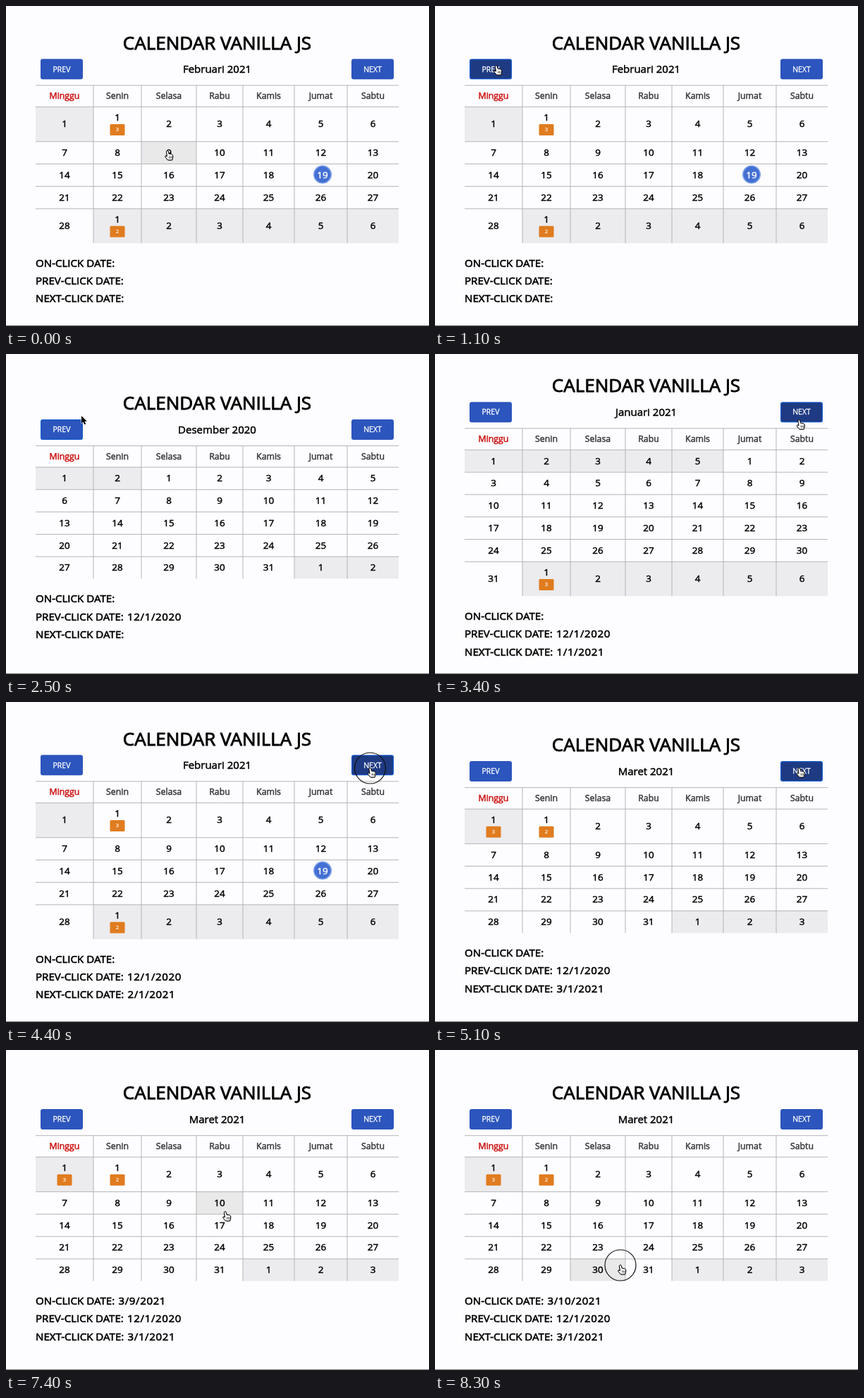
Recreate the animation shown at these times as an HTML page with a canvas. Size 600 by 455 pixels, loop 8.5 s.

```html
<!DOCTYPE html>
<html lang="id">
<head>
<meta charset="utf-8">
<title>Calendar Vanilla JS</title>
<style>
  html, body { margin: 0; width: 100%; height: 100%; overflow: hidden; background: #fdfcfe; }
  canvas { display: block; }
</style>
</head>
<body>
<canvas id="stage" width="600" height="455"></canvas>
<script>
const ctx = document.getElementById('stage').getContext('2d');
const LOOP = 8500, STEP = 100;

const COLUMNS = [42, 124, 192, 270, 336, 409, 484, 557];
const WEEKDAYS = ['Minggu', 'Senin', 'Selasa', 'Rabu', 'Kamis', 'Jumat', 'Sabtu'];
const MONTHS = { '-1': 'Desember 2020', 0: 'Januari 2021', 1: 'Februari 2021', 2: 'Maret 2021' };
const EVENTS = { '1/1': 3, '2/1': 2 };   // month index / day -> number of events
const HEAD = 30.5, ROW = 31.8, TALL_ROW = 49.4;
const PREV_X = 49, NEXT_X = 490, BUTTON_W = 60, BUTTON_H = 29;

// Timelines: [start time, value]
const monthLine = [[0, 1], [1200, 0], [2000, -1], [3200, 0], [3800, 1], [4500, 2]];
const focusLine = [[0, ''], [1100, 'PREV'], [3100, 'NEXT'], [6500, '']];
const dateLines = {
  ON: [[0, ''], [6600, '3/9/2021'], [7700, '3/10/2021']],
  PREV: [[0, ''], [1200, '1/1/2021'], [2000, '12/1/2020']],
  NEXT: [[0, ''], [3200, '1/1/2021'], [3800, '2/1/2021'], [4500, '3/1/2021']]
};
const clicks = [1000, 1900, 3000, 3700, 4400, 6500, 7600, 8300];

// Pointer path: time, x, y
const pointerPath = [
  [0, 229, 206], [900, 87, 85], [2000, 87, 85], [2100, 107, 88], [2500, 107, 88],
  [3000, 516.5, 94], [5100, 516.5, 94], [5800, 285, 247], [5900, 267.5, 251],
  [6300, 229, 214], [7000, 229, 214], [7400, 311, 230], [7600, 304, 216],
  [8000, 304, 216], [8200, 263, 306], [LOOP, 263, 306]
];

const handShape = new Path2D('M-1.6 .6Q-.3-1 1.1.4L2.1 4.3Q6.4 4 7.6 6.2L7.7 9 6.6 13H.6L-3 8.9Q-3.6 7.1-2 7L-.5 8Z');
const handFingers = new Path2D('M2.4 7.6l.3 3M4.2 7.6l.2 3M6 7.6v3');
const arrowShape = new Path2D('M0 0V10.6L2.5 8.4 4.3 12.3 6.2 11.5 4.5 7.7H7.8Z');

const valueAt = (line, t) => line.filter(([start]) => start <= t).pop()[1];

function pointerAt(t) {
  const i = pointerPath.findIndex(([time]) => time > t);
  const [t0, x0, y0] = pointerPath[i - 1], [t1, x1, y1] = pointerPath[i];
  const p = (t - t0) / (t1 - t0), eased = p * p * (3 - 2 * p);
  return { x: x0 + (x1 - x0) * eased, y: y0 + (y1 - y0) * eased };
}

function text(str, x, y, size, { color = '#000', align = 'center', weight = 0, spacing = 0 } = {}) {
  ctx.font = `${size}px "Open Sans", "Noto Sans", sans-serif`;
  ctx.textAlign = align;
  ctx.letterSpacing = spacing + 'px';
  ctx.fillStyle = ctx.strokeStyle = color;
  ctx.fillText(str, x, y);
  if (weight) {
    ctx.lineWidth = weight;
    ctx.lineJoin = 'round';
    ctx.strokeText(str, x, y);
  }
  return ctx.measureText(str).width;
}

function box(x, y, w, h, color, radius = 0) {
  ctx.fillStyle = color;
  ctx.beginPath();
  ctx.roundRect(x, y, w, h, radius);
  ctx.fill();
}

function circle(x, y, r, stroke, width, fill) {
  ctx.beginPath();
  ctx.arc(x, y, r, 0, Math.PI * 2);
  if (fill) { ctx.fillStyle = fill; ctx.fill(); }
  ctx.strokeStyle = stroke;
  ctx.lineWidth = width;
  ctx.stroke();
}

const inside = (p, r) => p.x >= r.x && p.x < r.x + r.w && p.y >= r.y && p.y < r.y + r.h;

function layout(month) {
  const lead = new Date(2021, month, 1).getDay();
  const days = new Date(2021, month + 1, 0).getDate();
  const cells = Array.from({ length: Math.ceil((lead + days) / 7) * 7 }, (_, i) => {
    const offset = i < lead ? -1 : i < lead + days ? 0 : 1;
    const day = i + 1 - [0, lead, lead + days][offset + 1];
    return {
      day, muted: offset !== 0,
      events: EVENTS[`${month + offset}/${day}`],
      today: month + offset === 1 && day === 19
    };
  });
  const heights = [];
  for (let i = 0; i < cells.length; i += 7)
    heights.push(cells.slice(i, i + 7).some(c => c.events) ? TALL_ROW : ROW);
  const total = heights.reduce((a, b) => a + b);
  const top = 112.5 + (194.2 - total) / 2;   // the page is centred vertically
  let y = top + HEAD;
  heights.forEach((h, row) => {
    for (let col = 0; col < 7; col++)
      Object.assign(cells[row * 7 + col], { x: COLUMNS[col], y, w: COLUMNS[col + 1] - COLUMNS[col], h });
    y += h;
  });
  const button = (label, x) => ({ label, x, y: top - 37.2, w: BUTTON_W, h: BUTTON_H });
  return { cells, top, bottom: y, buttons: [button('PREV', PREV_X), button('NEXT', NEXT_X)] };
}

function drawButton(b, hovered, focused) {
  box(b.x, b.y, b.w, b.h, focused ? '#1659ca' : '#2c55bd', 3);
  box(b.x + 1.3, b.y + 1.3, b.w - 2.6, b.h - 2.6, hovered ? '#1e3a82' : '#2c55bd', 2);
  text(b.label, b.x + b.w / 2, b.y + 18.2, 10.5, { color: '#fff', weight: .3 });
}

function drawCell(c, hovered) {
  if (c.muted || hovered) box(c.x, c.y, c.w, c.h, c.muted ? '#ecebed' : '#e9e9ea');
  const cx = c.x + c.w / 2;
  let cy = c.y + c.h / 2;
  if (c.events) {
    cy = c.y + 15.5;
    box(cx - 10.5, c.y + 25, 21, 16, '#e07c1f', 1.5);
    text(c.events, cx, c.y + 35.2, 7.5, { color: '#fff', weight: .2 });
  }
  if (c.today) circle(cx + 2.5, cy - .5, 12.3, '#82a6ea', 1.6, '#446fd3');
  text(c.day, c.today ? cx + 2.5 : cx, cy + 4.7, 13.5, { color: c.today ? '#fff' : '#000', weight: .45 });
}

function drawGrid(cells, top, bottom) {
  ctx.strokeStyle = '#b5b4b6';
  ctx.lineWidth = 1;
  ctx.beginPath();
  const rows = [top, ...cells.filter((_, i) => i % 7 === 0).map(c => c.y)];
  for (const y of rows) {
    ctx.moveTo(COLUMNS[0], y + .4);
    ctx.lineTo(COLUMNS[7], y + .4);
  }
  for (const x of COLUMNS.slice(1, 7)) {
    ctx.moveTo(x, top);
    ctx.lineTo(x, bottom);
  }
  ctx.stroke();
}

function drawPointer(p, isHand) {
  ctx.save();
  ctx.translate(p.x, p.y);
  ctx.lineWidth = 1;
  ctx.lineJoin = 'round';
  ctx.fillStyle = isHand ? '#fff' : '#000';
  ctx.strokeStyle = isHand ? '#111' : '#fff';
  const shape = isHand ? handShape : arrowShape;
  ctx.stroke(shape);
  ctx.fill(shape);
  if (isHand) {
    ctx.stroke(shape);
    ctx.lineWidth = .7;
    ctx.stroke(handFingers);
  }
  ctx.restore();
}

function draw(t) {
  const month = valueAt(monthLine, t), focus = valueAt(focusLine, t);
  const { cells, top, bottom, buttons } = layout(month);
  const pointer = pointerAt(t);
  const hoverPoint = pointerAt(Math.max(0, t - STEP));   // hover styles trail the pointer

  box(0, 0, 600, 455, '#fdfcfe');
  box(0, 454, 600, 1, '#7d7d7e');
  text('CALENDAR VANILLA JS', 299.5, top - 51, 26, { weight: .9 });
  text(MONTHS[month], 299.5, top - 17.3, 15, { weight: .5 });
  for (const b of buttons) drawButton(b, inside(hoverPoint, b), focus === b.label);
  for (const c of cells) drawCell(c, inside(hoverPoint, c));
  drawGrid(cells, top, bottom);
  WEEKDAYS.forEach((name, i) => text(name, (COLUMNS[i] + COLUMNS[i + 1]) / 2, top + 19.7, 12.3,
    { color: i ? '#3a3a3c' : '#cc1010', weight: .5 }));

  Object.entries(dateLines).forEach(([name, line], i) => {
    const y = bottom + 33.6 + i * 25.3;
    const width = text(`${name}-CLICK DATE:`, 42, y, 15.1, { align: 'left', weight: .6 });
    text(valueAt(line, t), 42 + width + 5.2, y, 15.1, { align: 'left', weight: .6, spacing: .6 });
  });

  if (clicks.some(c => t >= c && t < c + STEP)) circle(pointer.x, pointer.y, 22, '#111', 1.2);
  drawPointer(pointer, [...cells, ...buttons].some(r => inside(pointer, r)));
}

const start = performance.now();
function tick() {
  const t = Math.max(0, performance.now() - start) % LOOP;
  draw(Math.min(Math.floor(t / STEP) * STEP, 8300));
  requestAnimationFrame(tick);
}
tick();
</script>
</body>
</html>
```
